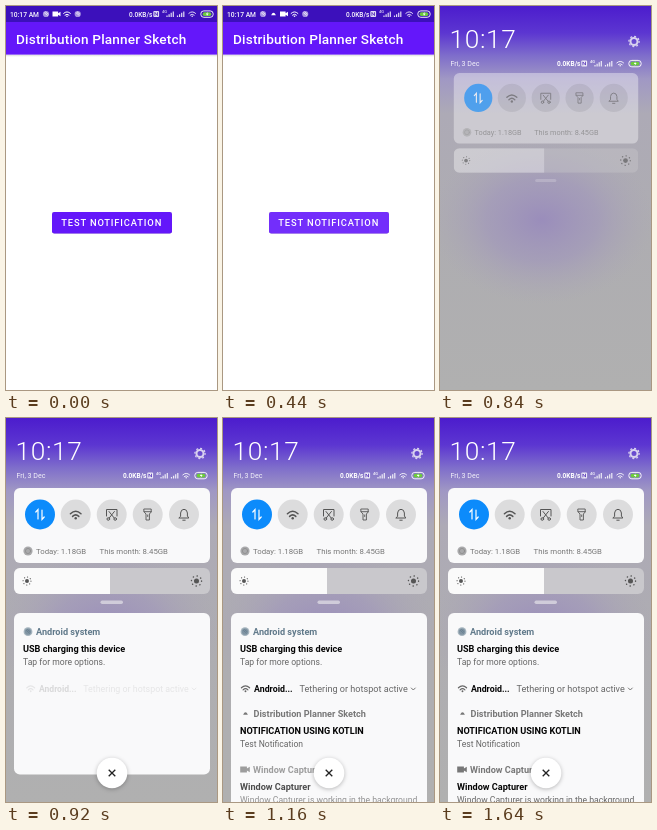
Recreate the animation shown at these times as an HTML page. Size 211 by 384 pixels, loop 1680 ms.

```html
<!DOCTYPE html>
<html lang="en">
<head>
<meta charset="utf-8">
<title>Notification demo</title>
<style>
  html, body { margin: 0; width: 100%; height: 100%; overflow: hidden; background: #fff; }
  svg { display: block; width: 100vw; height: 100vh; font-family: Roboto, sans-serif; }
  .line { fill: none; stroke: currentColor; stroke-linecap: round; }
  .head { font-size: 9.15px; font-weight: 700; fill: #777; }
  .title { font-size: 9.15px; font-weight: 700; fill: #050505; }
  .body { font-size: 8.6px; fill: #666; }
</style>
</head>
<body>
<svg viewBox="0 0 211 384">
  <defs>
    <linearGradient id="barShadow" x2="0" y2="1">
      <stop stop-color="#999" stop-opacity=".45"/><stop offset="1" stop-color="#fff" stop-opacity="0"/>
    </linearGradient>
    <linearGradient id="backdrop" x2="0" y2="1">
      <stop stop-color="#4c1ccd"/><stop offset=".07" stop-color="#5c36d1"/>
      <stop offset=".13" stop-color="#7f6ecb"/><stop offset=".19" stop-color="#a098c4"/>
      <stop offset=".28" stop-color="#adaab6"/><stop offset=".6" stop-color="#aeadb1"/>
      <stop offset="1" stop-color="#b0b0b0"/>
    </linearGradient>
    <radialGradient id="glow">
      <stop stop-color="#9a8dbb"/><stop offset=".5" stop-color="#a096bb" stop-opacity=".65"/>
      <stop offset="1" stop-color="#aaa5b6" stop-opacity="0"/>
    </radialGradient>
    <clipPath id="buttonClip"><rect x="46" y="206" width="120" height="21.5" rx="2.3"/></clipPath>
    <clipPath id="sliderClip"><rect x="8" y="150" width="196" height="26" rx="6"/></clipPath>

    <g id="wifi">
      <path class="line" d="M-3.4-1Q0-4.2 3.4-1M-2 .7Q0-1.2 2 .7" stroke-width="1"/>
      <circle cy="1.9" r=".8" fill="currentColor"/>
    </g>
    <path id="bars" d="M0 3V1.4M2.1 3V.2M4.2 3V-1.2M6.3 3V-2.6" fill="none" stroke="currentColor" stroke-width="1.2"/>
    <path id="camera" d="M-4-2.4H1.6V-.8L4-2.2V2.2L1.6.8V2.4H-4Z" fill="currentColor"/>
    <path id="caret" d="M-2.4 1.2Q0-3.6 2.4 1.2Z" fill="currentColor"/>
    <g id="disc">
      <circle r="3.1" fill="currentColor" opacity=".55"/>
      <path class="line" d="M-1.6-1.2L1.5 1.4M-.4-2L2 0" stroke-width=".7"/>
    </g>
    <g id="sun">
      <circle r="2.2" fill="currentColor"/>
      <circle class="line" r="4.4" stroke-width="1.2" stroke-dasharray=".2 3.256"/>
    </g>
    <g id="status" fill="#fff" color="#fff">
      <text x="123" y="10.5" font-size="6.5">0.0KB/s</text>
      <g opacity=".85">
        <rect x="147.3" y="4.9" width="5.8" height="6.2" rx="1"/>
        <path d="M148.9 9.8V6.4L151.5 9.6V6.2" fill="none" stroke="#4a25b4" stroke-width=".8"/>
        <text x="156" y="7.4" font-size="4">4G</text>
        <use href="#bars" x="161" y="8"/>
        <use href="#bars" x="171.5" y="8"/>
        <use href="#wifi" x="186.2" y="8.4"/>
      </g>
      <rect x="194.8" y="4.9" width="12.4" height="6.4" rx="3" fill="none" stroke="#fff" stroke-width=".9"/>
      <rect x="196.6" y="6.3" width="8.8" height="3.6" rx="1.7" fill="#6ccc3c"/>
      <path d="M201.6 5.8L199.8 8.4H201.2L200.6 10.4L202.6 7.6H201.2Z"/>
    </g>
  </defs>

  <g id="app">
    <rect width="211" height="384" fill="#fff"/>
    <rect y="48.6" width="211" height="3.2" fill="url(#barShadow)"/>
    <rect width="211" height="48.6" fill="#6417fa"/>
    <rect width="211" height="16" fill="#3c10bb"/>
    <g fill="#fff" color="#fff">
      <text x="4" y="10.5" font-size="6.7" font-weight="500">10:17 AM</text>
      <use href="#disc" x="40" y="8"/>
      <g id="newIcon"><use href="#caret"/></g>
      <g id="oldIcons">
        <use href="#camera" x="50.5" y="8"/><use href="#wifi" x="61" y="8.4"/><use href="#disc" x="71.7" y="8"/>
      </g>
      <text x="10" y="37.5" font-size="13.6" font-weight="500" letter-spacing=".17">Distribution Planner Sketch</text>
    </g>
    <use href="#status" font-weight="500"/>
    <rect x="46" y="206" width="120" height="21.5" rx="2.3" fill="#6417fa" style="filter:drop-shadow(0 .5px .7px #0004)"/>
    <g clip-path="url(#buttonClip)"><circle id="ripple" cx="106" cy="217" fill="#fff"/></g>
    <text x="55.3" y="220" font-size="9.4" font-weight="500" letter-spacing=".84" fill="#fff">TEST NOTIFICATION</text>
  </g>

  <g id="shade">
    <rect width="211" height="384" fill="url(#backdrop)"/>
    <ellipse cx="102" cy="214" rx="112" ry="84" fill="url(#glow)"/>
    <g fill="#fff" color="#d9d2ef">
      <text x="9.6" y="42" font-size="26.3" font-weight="300" letter-spacing=".6">10:17</text>
      <text x="10.5" y="60.3" font-size="7.1" opacity=".9">Fri, 3 Dec</text>
      <circle class="line" cx="194" cy="35.5" r="3.5" stroke-width="2"/>
      <circle class="line" cx="194" cy="35.5" r="5.1" stroke-width="1.3" stroke-dasharray="1 3.006"/>
    </g>
    <use href="#status" x="-6" y="49.5" font-weight="700"/>

    <g id="panel">
      <g id="panelBase">
        <rect x="8" y="70" width="196" height="75" rx="6" fill="#f9f9fa"/>
        <g clip-path="url(#sliderClip)">
          <rect x="8" y="150" width="196" height="26" fill="#c9c8cc"/>
          <rect x="8" y="150" width="96" height="26" fill="#fafafa"/>
        </g>
        <rect x="94.5" y="182.5" width="22.5" height="3.4" rx="1.7" fill="#d0ccda"/>
      </g>
      <g id="panelContent" color="#555">
        <circle cx="34" cy="96.5" r="15" fill="#0c8bfb"/>
        <g fill="#000" opacity=".11">
          <circle cx="69.7" cy="96.5" r="15"/><circle cx="105.7" cy="96.5" r="15"/>
          <circle cx="141.7" cy="96.5" r="15"/><circle cx="178" cy="96.5" r="15"/>
        </g>
        <path class="line" d="M32 101V91.5L29.8 94M36 92V101.5L38.2 99" stroke-width="1.2" color="#fff"/>
        <use href="#wifi" transform="translate(69.7 97.3) scale(1.55)"/>
        <path class="line" d="M100.5 98V91.5H111V98M103 93.5L108.2 100M108.4 93.5L103.2 100" stroke-width="1"/>
        <g class="line"><circle cx="102.3" cy="101" r="1.3"/><circle cx="109.2" cy="101" r="1.3"/></g>
        <path class="line" d="M138.2 91H145.2V94L143.4 96V102H140V96L138.2 94ZM138.2 93.7H145.2M141.7 97V98.5" stroke-width=".9"/>
        <path class="line" d="M173.2 100H182.8L181.4 98V95Q181.2 91.5 178 91.3Q174.8 91.5 174.6 95V98ZM176.8 102.2H179.2" stroke-width="1"/>
        <circle cx="22" cy="133" r="4.6" fill="#a9a9ab"/>
        <circle class="line" cx="22" cy="133" r="2.6" stroke-width=".7" color="#888"/>
        <g font-size="7.8" fill="#777">
          <text x="30" y="136">Today: 1.18GB</text><text x="93.5" y="136">This month: 8.45GB</text>
        </g>
        <use href="#sun" transform="translate(21 163) scale(.9)"/>
        <use href="#sun" transform="translate(190.5 163) scale(1.15)"/>
      </g>
    </g>

    <g id="card">
      <rect id="cardBase" x="8" y="195" width="196" rx="6" fill="#f9f9fa"/>
      <g class="row" color="#60798a">
        <circle cx="22" cy="213.7" r="4.4" fill="#a5b4be"/><use href="#disc" x="22" y="213.7"/>
        <text class="head" x="30" y="217" style="fill:#60798a">Android system</text>
        <text class="title" x="17" y="234">USB charging this device</text>
        <text class="body" x="17" y="247.3">Tap for more options.</text>
      </g>
      <g class="row" color="#666">
        <use href="#wifi" transform="translate(22.5 271) scale(1.2)"/>
        <text class="title" x="31" y="274" style="font-size:8.8px">Android...</text>
        <text class="body" x="76.5" y="274" style="font-size:9.1px">Tethering or hotspot active</text>
        <path class="line" d="M188.3 270L190.3 272L192.3 270" stroke-width=".9"/>
      </g>
      <g class="row" color="#777">
        <use href="#caret" x="22.5" y="295.5"/>
        <text class="head" x="30.5" y="299">Distribution Planner Sketch</text>
        <text class="title" x="17" y="315.5">NOTIFICATION USING KOTLIN</text>
        <text class="body" x="17" y="329">Test Notification</text>
      </g>
      <g class="row" color="#777">
        <use href="#camera" transform="translate(22 351.5) scale(1.2)"/>
        <text class="head" x="30" y="355">Window Capturer</text>
        <text class="title" x="17" y="372">Window Capturer</text>
        <text class="body" x="17" y="385.3">Window Capturer is working in the background</text>
      </g>
      <circle cx="106" cy="355" r="15.3" fill="#fff" style="filter:drop-shadow(0 1px 2px #0004)"/>
      <path d="M102.7 351.7L109.3 358.3M109.3 351.7L102.7 358.3" stroke="#222" stroke-width="1.3"/>
    </g>
  </g>
</svg>
<script>
const LOOP = 1680, SHADE_START = 840;
const $ = id => document.getElementById(id);
const rows = [...document.querySelectorAll('.row')];
const rowTimes = [[850, 915], [900, 1060], [960, 1130], [1040, 1400]];

const progress = (t, from, to) => Math.min(1, Math.max(0, (t - from) / (to - from)));
const easeOut = x => 1 - (1 - x) ** 3;
const set = (node, attrs) => {
  for (const name in attrs) node.setAttribute(name, attrs[name]);
};
const scaleAt = (x, y, s) => `translate(${x * (1 - s)} ${y * (1 - s)}) scale(${s})`;

function drawApp(t) {
  const icon = easeOut(progress(t, 200, 440));
  set($('newIcon'), { transform: `translate(50.5 8) scale(${icon})` });
  set($('oldIcons'), { transform: `translate(${10.5 * icon} 0)` });
  set($('ripple'), {
    r: 64 * easeOut(progress(t, 20, 280)),
    opacity: 0.1 * (1 - progress(t, 440, 600))
  });
}

function drawShade(t) {
  const open = progress(t, 788, 918);
  set($('panel'), { transform: scaleAt(106, 20, 0.9 + 0.1 * open) });
  set($('panelBase'), { opacity: open });
  set($('panelContent'), { opacity: Math.sqrt(open) });

  set($('card'), { opacity: progress(t, 845, 915) });
  set($('cardBase'), { height: 82 + 140 * easeOut(progress(t, 860, 1110)) });
  rows.forEach((row, i) => {
    const shown = progress(t, ...rowTimes[i]);
    const alpha = i === 3 ? easeOut(shown) : shown;
    set(row, { opacity: alpha, transform: scaleAt(106, 271, i === 1 ? 0.97 + 0.03 * alpha : 1) });
  });
}

function frame(now) {
  const t = now % LOOP;
  const shadeOpen = t >= SHADE_START;
  set($('app'), { display: shadeOpen ? 'none' : 'inline' });
  set($('shade'), { display: shadeOpen ? 'inline' : 'none' });
  (shadeOpen ? drawShade : drawApp)(t);
}

const start = performance.now();
function tick() {
  frame(performance.now() - start);
  requestAnimationFrame(tick);
}
tick();
</script>
</body>
</html>
```
